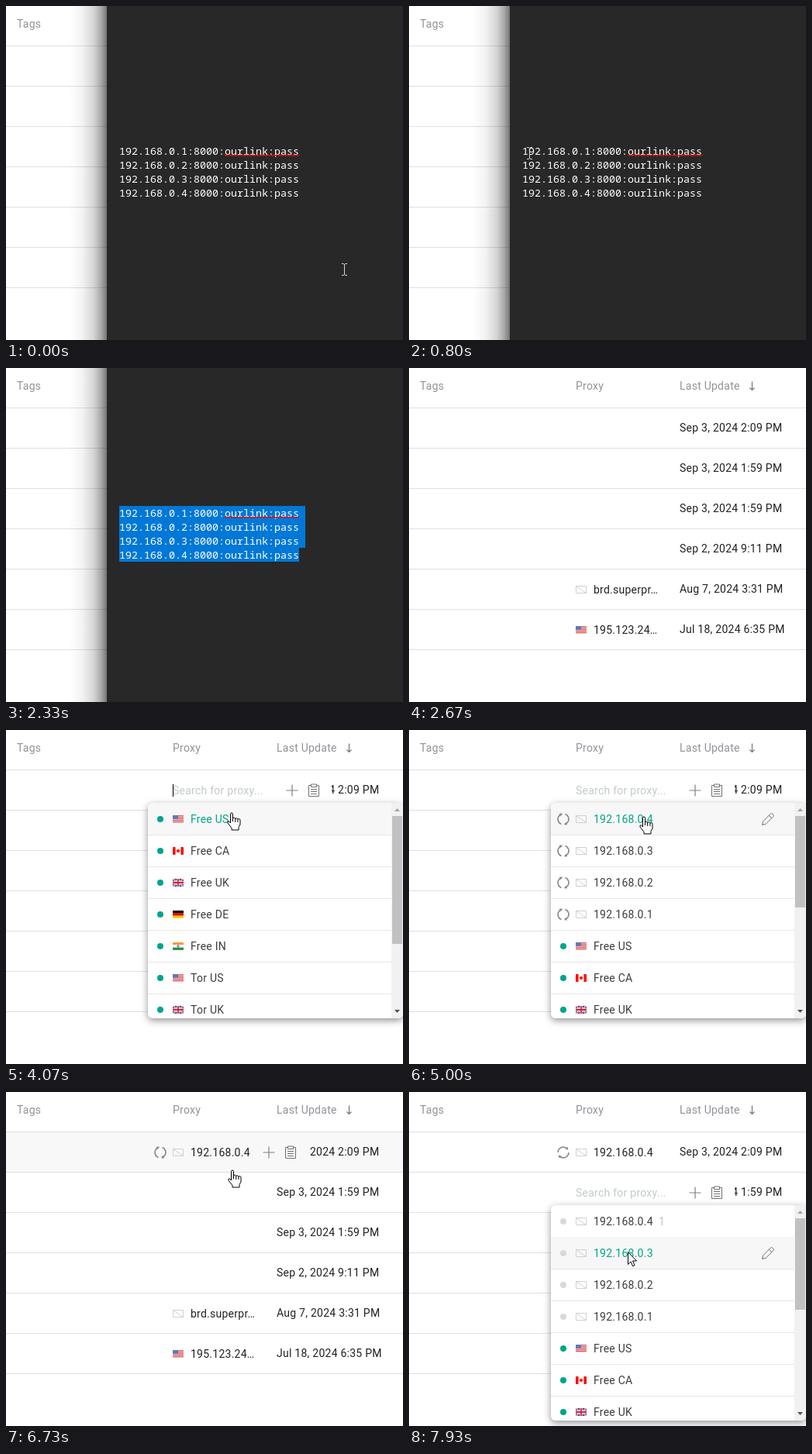
An HTML page with a canvas that plays this animation: 512 by 431 pixels, repeating every 8 s.

```html
<!DOCTYPE html>
<html lang="en">
<head>
<meta charset="utf-8">
<title>Pasting proxies</title>
<style>
  html, body { margin: 0; width: 100%; height: 100%; overflow: hidden; background: #fff; }
  canvas { display: block; }
</style>
</head>
<body>
<canvas id="stage" width="512" height="431"></canvas>
<script>
const ctx = document.getElementById('stage').getContext('2d');
const W = 512, H = 431, LOOP = 8000, FPS = 15;
const SANS = '14px Roboto, sans-serif', MONO = '13.333px "Noto Sans Mono", monospace';
const GREEN = '#00a58a', INK = '#212121', ITEM_INK = '#3c3c3c', MUTED = '#8f9499';

// Scene changes, in ms
const WINDOW_HIDES = 2670, MENU_OPENS = 3730, PASTED = 4470, PICKED = 6400, MENU_REOPENS = 7270;
const ROW = 52, ITEM = 41, MENU_X = 183, MENU_H = 278, SCROLL_X = 497;

const dates = ['Sep 3, 2024 2:09 PM', 'Sep 3, 2024 1:59 PM', 'Sep 3, 2024 1:59 PM',
  'Sep 2, 2024 9:11 PM', 'Aug 7, 2024 3:31 PM', 'Jul 18, 2024 6:35 PM'];
const freeProxies = ['Free US', 'Free CA', 'Free UK', 'Free DE', 'Free IN', 'Tor US', 'Tor UK'];
const pasted = [4, 3, 2, 1].map(n => '192.168.0.' + n);

// Pointer path: time, x, y, shape
const pointer = [
  [0, 436, 340, 'beam'], [70, 436, 340, 'beam'], [870, 149, 187, 'beam'], [1130, 380, 244, 'beam'],
  [1270, 362, 241, 'arrow'], [1670, 362, 241, 'arrow'], [2330, -30, -22, 'arrow'],
  [3000, 500, -25, 'arrow'], [3070, 467, 7, 'arrow'], [3330, 207, 73, 'hand'], [3670, 207, 73, 'hand'],
  [4070, 291, 107, 'hand'], [4270, 397, 75, 'hand'], [4600, 397, 75, 'hand'], [4930, 303, 112, 'hand'],
  [6400, 303, 112, 'hand'], [6730, 292, 101, 'hand'], [7130, 285, 126, 'hand'],
  [7270, 285, 126, 'hand'], [7930, 282, 206, 'arrow'], [8000, 282, 206, 'arrow']
];

const shapes = {
  arrow: new Path2D('M.5 .5V16.5L4 13L6.6 18.7L9 17.7L6.5 12H11.5Z'),
  hand: new Path2D('M-1.5 13V1.5A1.5 1.5 0 0 1 1.5 1.5V7.5A1.6 1.6 0 0 1 4.7 8A1.6 1.6 0 0 1 7.9 8.8' +
    'A1.5 1.5 0 0 1 11 9.8V15L9 18.5V22H0V19.5L-5 13Q-5.8 10.5-3.5 10.8Z M1.5 7.5V11M4.7 8V12M7.9 9V12'),
  beam: new Path2D('M-3 -7.5H-1L.5 -6.5L2 -7.5H4M.5 -6.5V6.5M-3 7.5H-1L.5 6.5L2 7.5H4'),
  plus: new Path2D('M-7.5 0H7.5M0 -7.5V7.5'),
  clipboard: new Path2D('M-3.5 -6.5H-6.5V7.5H6.5V-6.5H3.5M-3.5 -8H3.5V-4.5H-3.5ZM-4 -1.5H4M-4 1.5H4M-4 4.5H4'),
  pencil: new Path2D('M-7.5 7.5L-6.3 2.8L3.6 -7.2Q4.6 -7.8 5.6 -7L7 -5.6Q7.8 -4.6 7.2 -3.6L-2.8 6.3ZM1.2 -4.8L4.8 -1.2'),
  sortArrow: new Path2D('M0 -5.5V5.5M-3 2.5L0 5.5L3 2.5'),
  noFlag: new Path2D('M.5 .5H13.5V9.5H.5ZM.5 .5L13.5 9.5')
};

function rect(x, y, w, h, color) {
  ctx.fillStyle = color;
  ctx.fillRect(x, y, w, h);
}

function text(str, x, y, color, font = SANS) {
  ctx.font = font;
  ctx.letterSpacing = font === SANS ? '0.25px' : '0px';
  ctx.fillStyle = color;
  ctx.fillText(str, x, y);
}

function icon(name, x, y, stroke, fill, width = 1) {
  ctx.save();
  ctx.translate(x, y);
  if (fill) { ctx.fillStyle = fill; ctx.fill(shapes[name]); }
  ctx.strokeStyle = stroke;
  ctx.lineWidth = width;
  ctx.stroke(shapes[name]);
  ctx.restore();
}

function dot(x, y, color) {
  ctx.fillStyle = color;
  ctx.beginPath();
  ctx.arc(x, y, 4, 0, 7);
  ctx.fill();
}

function triangle(x, y, dir, color) {
  ctx.fillStyle = color;
  ctx.beginPath();
  ctx.moveTo(x - 3.5, y - 2 * dir);
  ctx.lineTo(x + 3.5, y - 2 * dir);
  ctx.lineTo(x, y + 2 * dir);
  ctx.fill();
}

function spinner(x, y, t) {
  ctx.save();
  ctx.translate(x, y);
  ctx.rotate((t - 5000) / 1730 * 2 * Math.PI);
  ctx.strokeStyle = ctx.fillStyle = '#858585';
  ctx.lineWidth = 1.6;
  for (let i = 0; i < 2; i++) {
    ctx.beginPath();
    ctx.arc(0, 0, 7, -1.2, 1.2);
    ctx.stroke();
    ctx.beginPath();
    ctx.moveTo(1, 7.2);
    ctx.lineTo(3.4, 3.8);
    ctx.lineTo(5, 7.6);
    ctx.fill();
    ctx.rotate(Math.PI);
  }
  ctx.restore();
}

function flag(code, x, y) {
  ctx.save();
  ctx.translate(x, y);
  const line = (path, color, width) => {
    ctx.strokeStyle = color;
    ctx.lineWidth = width;
    ctx.stroke(new Path2D(path));
  };
  ctx.beginPath();
  ctx.roundRect(0, 0, 14, 10, 1);
  ctx.clip();
  if (code === 'US') {
    rect(0, 0, 14, 10, '#f3d0d0');
    for (let i = 0; i < 10; i += 2) rect(0, i, 14, 1.1, '#dc5a5e');
    rect(0, 0, 7, 5, '#6478b8');
  } else if (code === 'CA') {
    rect(0, 0, 14, 10, '#fff');
    rect(0, 0, 3.5, 10, '#f00');
    rect(10.5, 0, 3.5, 10, '#f00');
    ctx.fillStyle = '#f00';
    ctx.fill(new Path2D('M7 2L8 4L9.5 4L8.5 6.5H7.3V8H6.7V6.5H5.5L4.5 4L6 4Z'));
  } else if (code === 'UK') {
    rect(0, 0, 14, 10, '#1d2f7c');
    line('M0 0L14 10M14 0L0 10', '#fff', 2);
    line('M0 0L14 10M14 0L0 10', '#d8203a', .8);
    line('M7 0V10M0 5H14', '#fff', 3.4);
    line('M7 0V10M0 5H14', '#d8203a', 1.8);
  } else {
    const bands = code === 'DE' ? ['#000', '#d00', '#ffce00'] : ['#f49a3c', '#fff', '#2c9140'];
    bands.forEach((color, i) => rect(0, i * 10 / 3, 14, 3.4, color));
    if (code === 'IN') {
      ctx.beginPath();
      ctx.arc(7, 5, 1.2, 0, 7);
      ctx.strokeStyle = '#3a3a90';
      ctx.lineWidth = .8;
      ctx.stroke();
    }
  }
  ctx.restore();
}

function pointerAt(t) {
  let i = 0;
  while (i < pointer.length - 2 && pointer[i + 1][0] <= t) i++;
  const [t0, x0, y0, shape] = pointer[i], [t1, x1, y1] = pointer[i + 1];
  const p = (t - t0) / (t1 - t0), ease = p * p * (3 - 2 * p);
  return { x: x0 + (x1 - x0) * ease, y: y0 + (y1 - y0) * ease, shape };
}

function proxyCell(label, y, country) {
  if (country) flag(country, 215, y - 5);
  else icon('noFlag', 215, y - 5, '#d0d0d0');
  text(label, 238, y + 5, INK);
}

function drawTable(t, cursor, menuRow) {
  const hovered = menuRow < 0 && t >= WINDOW_HIDES ? Math.floor((cursor.y - ROW) / ROW) : -1;
  text('Tags', 14, 28, MUTED);
  text('Proxy', 215, 28, MUTED);
  text('Last Update', 349, 28, MUTED);
  icon('sortArrow', 442.5, 23, '#757575', null, 1.2);
  rect(0, 51, W, 1, '#e0e0e0');

  dates.forEach((date, i) => {
    const top = ROW * (i + 1), y = top + 26;
    const hover = i === hovered, editing = i === menuRow;
    if (hover) rect(0, top, W, ROW - 1, '#f8f8f8');
    rect(0, top + ROW - 1, W, 1, '#e0e0e0');

    const dateLeft = editing ? 420 : hover ? 391 : 340;
    ctx.save();
    ctx.beginPath();
    ctx.rect(dateLeft, top, W, ROW);
    ctx.clip();
    text(date, 349, y + 4, INK);
    ctx.restore();

    if (editing || hover) {
      const x = editing ? 369 : 339;
      icon('plus', x, y, '#808080', null, 1.2);
      icon('clipboard', x + 28, y, '#707070');
    }
    if (editing) {
      text('Search for proxy...', 215, y + 5, '#c2cbc6');
      const opened = i ? MENU_REOPENS : MENU_OPENS;
      if (!(i === 0 && t >= PASTED) && (t - opened) % 1000 < 500) rect(215, y - 8, 1, 16, '#000');
    } else if (i === 0 && t >= PICKED) {
      spinner(199, y, t);
      proxyCell(pasted[0], y);
    }
  });
  proxyCell('brd.superpr…', 286);
  proxyCell('195.123.24…', 338, 'US');
}

function drawMenu(t, cursor, row) {
  const top = 94 + row * ROW;
  const hasPasted = t >= PASTED;
  const items = hasPasted ? [...pasted, ...freeProxies] : freeProxies;
  const checked = t >= MENU_REOPENS;

  ctx.save();
  ctx.beginPath();
  ctx.roundRect(MENU_X, top, W - MENU_X, MENU_H, 6);
  ctx.shadowColor = 'rgba(0,0,0,.42)';
  ctx.shadowBlur = 10;
  ctx.shadowOffsetY = 3;
  ctx.fillStyle = '#fff';
  ctx.fill();
  ctx.shadowColor = 'transparent';
  ctx.clip();

  items.slice(0, 7).forEach((label, i) => {
    const y0 = top + i * ITEM, y = y0 + 21;
    const custom = hasPasted && i < pasted.length;
    const hover = cursor.y >= y0 && cursor.y < y0 + ITEM;
    if (hover) rect(MENU_X, y0, SCROLL_X - MENU_X, ITEM, '#f7f7f7');
    rect(MENU_X, y0 + ITEM, SCROLL_X - MENU_X, 1, '#e6e6e6');
    if (custom && !checked) spinner(199, y, t);
    else dot(199, y, custom ? '#d9d9d9' : GREEN);
    if (custom) icon('noFlag', 215, y - 5, '#d0d0d0');
    else flag(label.slice(-2), 215, y - 5);
    text(label, 238, y + 5, hover ? GREEN : ITEM_INK);
    if (custom && checked && i === 0) text('1', 322, y + 5, '#c4c4c4');
    if (custom && hover) icon('pencil', 463, y, '#707070');
  });

  rect(SCROLL_X, top, W - SCROLL_X, MENU_H, '#f1f1f1');
  rect(SCROLL_X + 1, top + 17, 13, hasPasted ? 118 : 165, '#c1c1c1');
  triangle(504.5, top + 9, -1, '#a3a3a3');
  triangle(504.5, top + MENU_H - 9, 1, '#505050');
  ctx.restore();
}

function drawSelection(t, cursor) {
  const dragging = t < 1130;
  const lastLine = dragging ? Math.min(3, Math.floor((cursor.y - 178) / 18)) : 3;
  const columns = dragging ? Math.min(29, Math.round((cursor.x - 146) / 8)) : 29;
  for (let i = 0; i <= lastLine; i++) {
    rect(146, 178 + i * 18, i < lastLine ? 240 : columns * 8, 18, '#0078d7');
  }
}

function drawEditor(t, cursor) {
  const shade = ctx.createLinearGradient(82, 0, 130, 0);
  [[0, 0], [.35, .05], [.65, .17], [.85, .34], [1, .54]]
    .forEach(([at, alpha]) => shade.addColorStop(at, `rgba(0,0,0,${alpha})`));
  rect(82, 0, 48, H, shade);
  rect(130, 0, W - 130, H, '#282828');
  if (t > 870) drawSelection(t, cursor);

  for (let i = 0; i < 4; i++) {
    text(`192.168.0.${i + 1}:8000:ourlink:pass`, 146, 192 + i * 18, '#fff', MONO);
  }
  // Spell-check wave
  ctx.beginPath();
  for (let x = 282; x <= 378; x += 2) ctx.lineTo(x, x % 4 ? 192 : 193.5);
  ctx.strokeStyle = '#e01010';
  ctx.lineWidth = 1.3;
  ctx.stroke();
}

function draw(t) {
  const cursor = pointerAt(t);
  const menuRow = t >= MENU_REOPENS ? 1 : t >= MENU_OPENS && t < PICKED ? 0 : -1;
  rect(0, 0, W, H, '#fff');
  drawTable(t, cursor, menuRow);
  if (menuRow >= 0) drawMenu(t, cursor, menuRow);
  if (t < WINDOW_HIDES) drawEditor(t, cursor);

  const x = Math.round(cursor.x), y = Math.round(cursor.y);
  if (cursor.shape === 'beam') icon('beam', x, y, '#d8d8d8');
  else icon(cursor.shape, x, y, '#000', '#fff');
}

function tick(now) {
  const step = Math.floor((now % LOOP + 4) * FPS / 1000) % (LOOP * FPS / 1000);
  draw(Math.round(step * 100 / FPS) * 10);
  requestAnimationFrame(tick);
}
requestAnimationFrame(tick);
</script>
</body>
</html>
```
